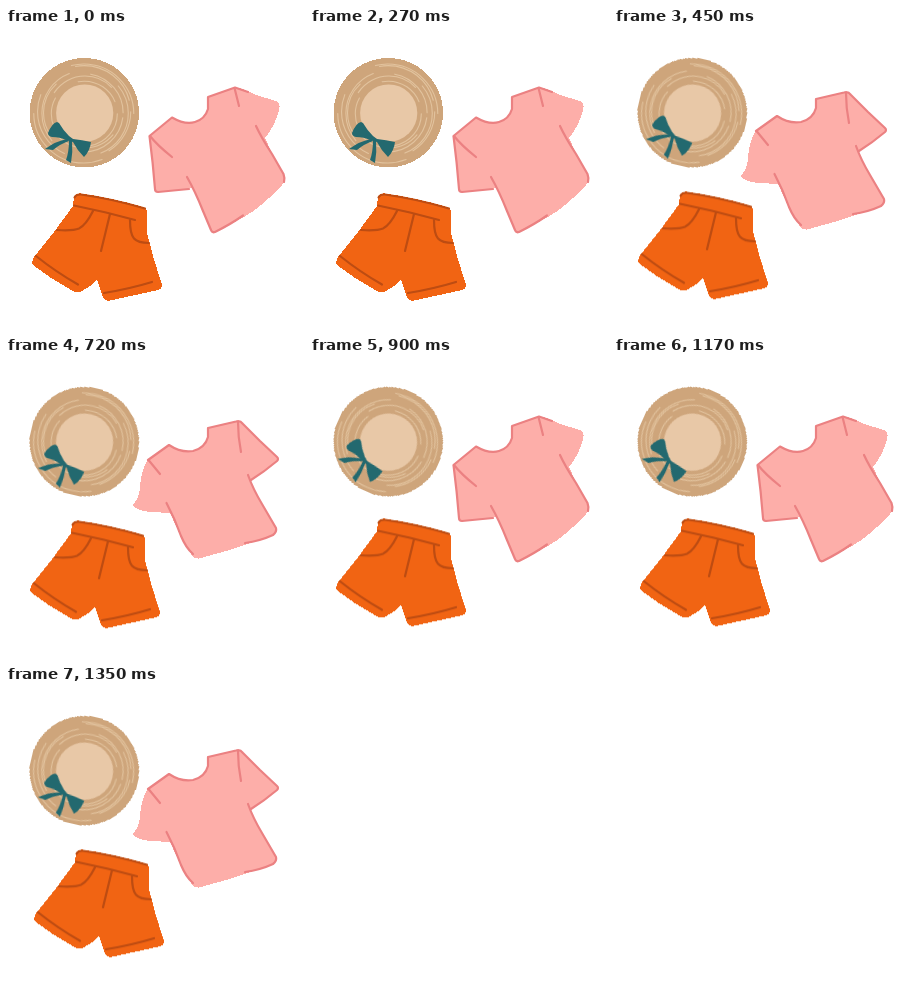
Recreate the animation shown at these times as an HTML page. Size 298 px wide and 301 px high, loop 1800 ms.

```html
<!DOCTYPE html>
<html lang="en">
<head>
<meta charset="utf-8">
<title>Summer clothes</title>
<style>
  html, body { margin: 0; width: 100%; height: 100%; overflow: hidden; background: #fff; }
  svg { display: block; width: 100vw; height: 100vh; }
  .line { fill: none; stroke-linecap: round; stroke-linejoin: round; }
  .edge { shape-rendering: crispEdges; }
  .pink { fill: #fdaea9; }
  .rose { stroke: #eb8182; stroke-width: 2.2; }
  .rust { stroke: #bd4c12; stroke-width: 2.2; }
  .straw { stroke: #e2c39e; stroke-width: 1.1; }
  #hat { transform-origin: 78.3px 84.7px; animation: turn 1.8s step-end infinite; }
  #shorts { animation: sway 1.8s step-end infinite; }
  #shirtLeft { animation: blink .9s step-end infinite; }
  #shirtRight { animation: blink .9s -.45s step-end infinite; }
  @keyframes turn {
    0% { transform: rotate(0deg); }
    25%, 75% { transform: rotate(13deg); }
    50% { transform: rotate(24deg); }
  }
  @keyframes sway {
    0% { transform: translate(0, 0); }
    25% { transform: translate(-2px, -1.7px); }
    50% { transform: translate(0, -3.7px); }
    75% { transform: translate(2px, -1.7px); }
  }
  @keyframes blink {
    0% { visibility: visible; }
    50%, 100% { visibility: hidden; }
  }
</style>
</head>
<body>
<svg viewBox="0 0 298 301" preserveAspectRatio="none">
  <g id="hat">
    <circle class="edge" cx="78.3" cy="84.7" r="54.7" fill="#cea57b"/>
    <g id="weave" class="line straw"></g>
    <circle cx="78.7" cy="85" r="28.6" fill="#e8c8a7"/>
    <g fill="#23696f">
      <path d="M51 94Q46 95 42 105Q42 108 46 109Q54 109 60 112L67 114Q71 122 78 129Q84 123 85 114Q76 112 67 111L63 108Q57 102 53 95Z"/>
      <path d="M61 111Q50 113 39 121L47 122Q54 116 63 113Z"/>
      <path d="M63 112Q63 124 60 132L65 135Q67 124 66 113Z"/>
    </g>
  </g>

  <g id="shorts">
    <path class="edge" fill="#f16413" d="M67 178L68 169Q70 165 75 165.5Q107 170 137 179Q141 180 141 184L141 205L147 228L156 257Q156 261 152 262L102 273Q98 272 97 269L91 251L86 257L75 263.5Q71 265 67 263L45 250L27 237Q25 234 28 229L48 204Z"/>
    <g class="line rust">
      <path d="M68.5 169.5Q70 166 75 166.5Q107 171 139 180.5" stroke-width="2"/>
      <path d="M68 177.5L100 184.5L129 192"/>
      <path d="M87 183Q80 197 73 200.5Q67 203 51 202"/>
      <path d="M104 186L95 223"/>
      <path d="M124 192Q124 206 128 210.5Q132 215 143 215"/>
      <path d="M30 228Q50 244 72 256.5"/>
      <path d="M98 265Q123 261 146 254"/>
    </g>
  </g>

  <g id="shirtLeft">
    <path class="edge pink" d="M143 108L166 89.5Q179 97 189 94Q199 91 202 81L202 69L229 59Q239 61 250 67L270 73Q275 75 273 82Q269 98 259 110L266 125L278 146Q280 152 276 157Q257 178 238 189L209 204.5Q206 205 205 202L197 183L186 160L152 164Q149 164 149 161Q147 135 143 108Z"/>
    <g class="line rose">
      <path d="M183 161L152 164Q149 164 149 161Q147 135 143.5 108L166 89.5Q179 97 189 94Q199 91 202 81L202 69L229 59.5L242 64"/>
      <path d="M144 108Q151 117 166 129"/>
      <path d="M228.5 60L233 78"/>
      <path d="M250 98Q255 109 266 126L277.5 146Q279 150 278 154"/>
      <path d="M181 149Q189 163 197 183L205 202Q206 205 209 204Q225 196 237 187.5"/>
    </g>
  </g>

  <g id="shirtRight">
    <path class="edge pink" d="M142 103L163 88Q175 96 187 94Q199 91 202 80L202 71L230 64Q234 63 237 67L254 84L271 100Q274 102 271 104Q258 116 244 124L256 147L270 171Q271 175 267 178Q243 187 220 194L193 201.5Q188 202 185 197L175 180L164 156L145 155Q134 154 128 150Q126 148 129 145Q134 139 134 128Q136 111 142 103Z"/>
    <g class="line rose">
      <path d="M142 103L163 88Q175 96 187 94Q199 91 202 80L202 71L230 64.5Q234 63 237 67L254 84L271 100Q273 102 271 104Q258 115 245 123"/>
      <path d="M142.5 103L154 117"/>
      <path d="M232 65Q232 80 235 95"/>
      <path d="M242 118Q247 132 256 147L270 171Q271 175 267 178Q254 184 239 186"/>
      <path d="M160.5 146Q169 162 175 179Q180 191 187 197"/>
    </g>
  </g>
</svg>
<script>
  const weave = document.getElementById('weave');
  const rings = 6;
  for (let i = 0; i < rings; i++) {
    const ring = document.createElementNS('http://www.w3.org/2000/svg', 'ellipse');
    const attributes = {
      cx: 78.3 + Math.sin(i * 2.4),
      cy: 84.7 + Math.cos(i * 2.4),
      rx: 33 + i * 3.4,
      ry: 32.5 + i * 3.4,
      pathLength: 100,
      'stroke-dasharray': `${22 + i * 7 % 13} ${14 + i * 5 % 9}`,
      'stroke-dashoffset': i * 37 % 100
    };
    for (const name in attributes) ring.setAttribute(name, attributes[name]);
    weave.append(ring);
  }
</script>
</body>
</html>
```
